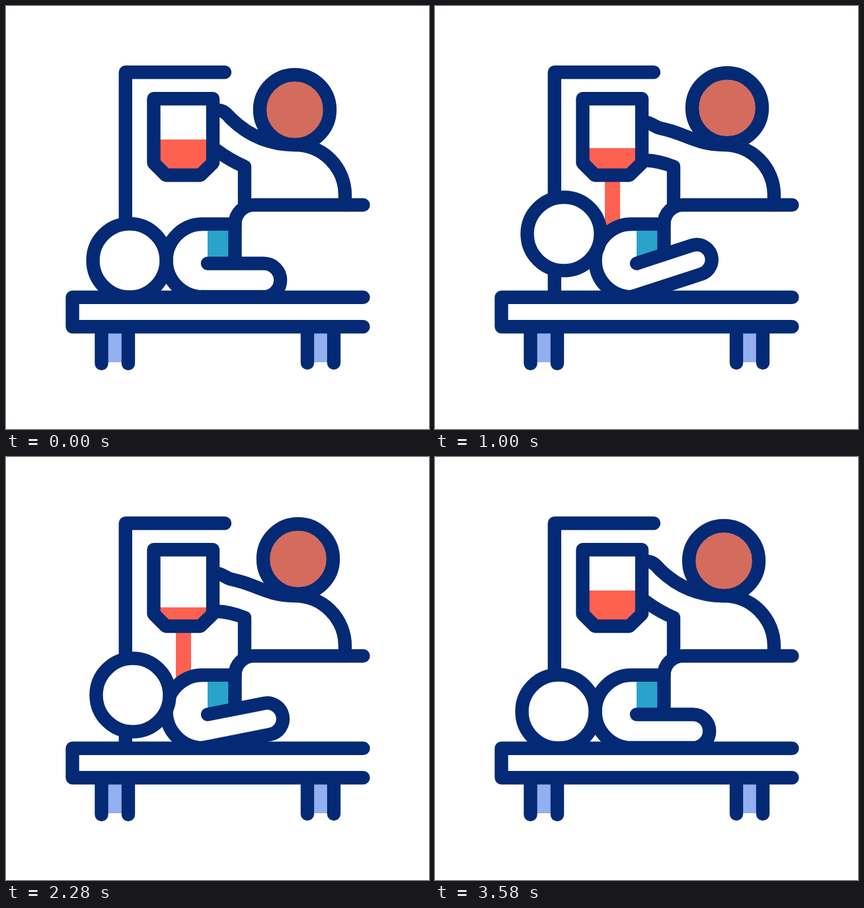
Write an HTML page that moves like this. It is 640 px wide and 640 px high and loops after 3600 ms.

```html
<!DOCTYPE html>
<html>
<head>
<meta charset="utf-8">
<style>
  html, body { margin: 0; height: 100%; overflow: hidden; background: #fff; }
  svg { display: block; width: 100vw; height: 100vh; }
  .line { fill: none; stroke: #042a75; stroke-width: 20.4; stroke-linecap: round; stroke-linejoin: round; }
  .solid { fill: #fff; }
  .red { fill: #ff6150; }
</style>
</head>
<body>
<svg viewBox="0 0 640 640">
  <path class="line" d="M331 100.2H180.8V440"/>
  <path id="stream" fill="none" stroke="#ff6150" stroke-width="23" stroke-linecap="round"/>
  <path id="blood" class="red"/>

  <g id="nurse">
    <path id="upperArm" class="line"/>
    <path id="lowerArm" class="line"/>
    <circle id="nurseHead" class="line" r="53" style="fill:#d46c5e"/>
  </g>
  <path class="line" d="M223.5 140.3H313V237.5L294 256H242L223.5 237.5Z"/>

  <path class="line solid" d="M346.5 330H297.5A55 55 0 0 0 297.5 440H305"/>
  <path fill="#2aa3cb" d="M305 340H346V389H305Z"/>
  <path id="sheet" class="line"/>
  <path id="patientArm" class="line solid"/>
  <circle id="patientHead" class="line solid" r="55.5"/>

  <path fill="#94aff0" d="M150 490H180V539H150ZM461 490H491V539H461Z"/>
  <path class="line" d="M144.5 490V541M185 490V541M456 490V540M496 490V540"/>
  <path class="line" d="M540.5 440.7H100.5V485.3H540.5"/>
</svg>
<script>
const LOOP = 3600;
const set = (id, attrs) => {
  const el = document.getElementById(id);
  for (const name in attrs) el.setAttribute(name, attrs[name]);
};
const ease = (t, from, to) => {
  const x = Math.min(1, Math.max(0, (t - from) / (to - from)));
  return (1 - Math.cos(Math.PI * x)) / 2;
};
// Rises to 1 over [a, b], falls back to 0 over [c, d].
const pulse = (t, a, b, c, d) => ease(t, a, b) - ease(t, c, d);

function drawPatient(lift) {
  set('patientHead', { cx: 187 + lift * 0.2, cy: 385 - lift });

  // The arm's two edges stay parallel while turning about the elbow and the hip.
  const angle = lift * 0.45, rad = angle * Math.PI / 180;
  const sin = Math.sin(rad), cos = Math.cos(rad);
  const width = 50.5 * cos - 7.5 * sin;
  const hip = -7.5 * cos - 50.5 * sin;
  const r = width / 2;
  set('patientArm', {
    d: `M0 0H${85 + lift * 0.08}a${r} ${r} 0 0 1 0 ${width}H${hip}`,
    transform: `translate(305 389.5) rotate(${-angle})`
  });
  set('sheet', { d: `M540.5 301H375A28.5 28.5 0 0 0 346.5 329.5V${389.5 - 41.5 * sin / cos}` });
}

function drawNurse(squeeze) {
  const mix = (a, b) => a + (b - a) * squeeze;
  set('nurseHead', { cx: mix(437, 442), cy: mix(157, 154.3) });
  set('upperArm', {
    d: `M320 ${mix(157.5, 176)}C${mix(331, 330)} ${mix(158, 178)} ${mix(335, 332)} ${mix(165, 183)} 341 ${mix(171, 185)}` +
       `C${mix(366, 378)} ${mix(195, 192)} ${mix(398, 392)} ${mix(210, 209)} 437 210A76 76 0 0 1 513 286V301`
  });
  set('lowerArm', { d: `M318 ${mix(218, 233.5)}Q338 ${mix(233, 234)} 361 243V301` });
}

function draw(t) {
  drawPatient(43 * pulse(t, 0, 1200, 1200, LOOP));
  drawNurse(pulse(t, 0, 300, 3300, LOOP));

  const level = 202 + 27 * pulse(t, 0, 2040, 2040, LOOP);
  set('blood', { d: `M224 ${level}H313V237L294 256H242L224 238Z` });
  const tip = 244.5 + 130 * pulse(t, 0, 1200, 2040, 2900);
  set('stream', { d: `M268.5 244V${tip}` });
}

function frame() {
  draw(performance.now() % LOOP);
  requestAnimationFrame(frame);
}
frame();
</script>
</body>
</html>
```
